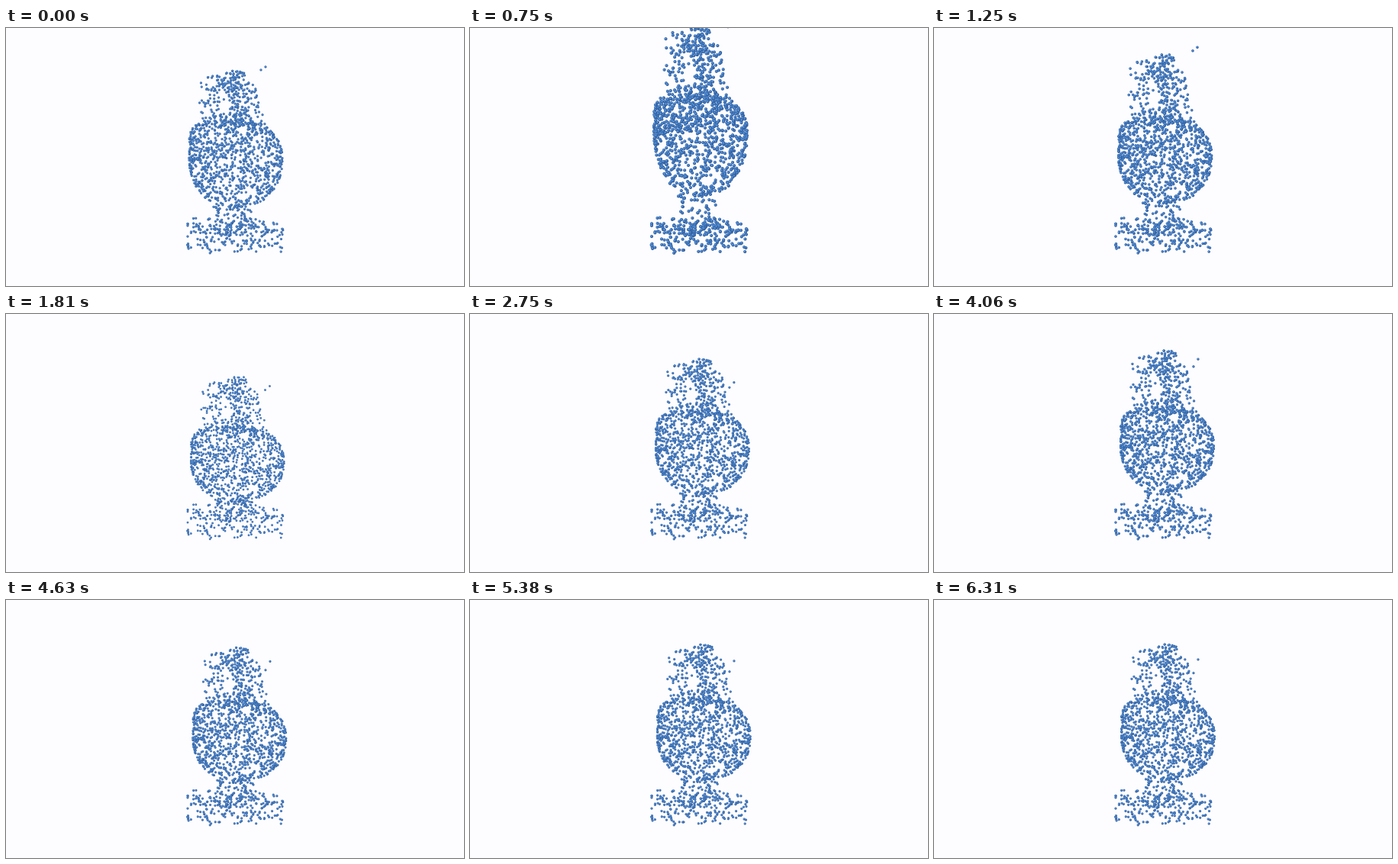
Recreate the animation shown at these times as a matplotlib script. Size 600 by 338 pixels, loop 6370 ms.

```python
import numpy as np
import matplotlib.pyplot as plt
from matplotlib.animation import FuncAnimation

W, H, DPI = 600, 338, 100
LOOP, FRAMES = 6370, 102
PX = 72 / DPI
rng = np.random.default_rng(11)

# Turning points of the vertical bounce: time in ms, offset in px
BEATS = np.array([-650, 700, 1950, 3440, 4750, 5500, 6400])
PEAKS = np.array([50, -60, 31, -23, 5, 0, 0])

# How strongly each rest height follows the bounce, going up and down
HEIGHTS = [57, 133, 180, 235, 250]
STRETCH = np.array([1, 0.7, 0.75, 0.27, 0])
SQUASH = np.array([1, 0.66, 0.5, 0.38, 0])
LEAD = np.array([0, 70, 70, 0, 0])


def swing(t):
    """Bounce offset at time t, eased between turning points."""
    t = np.asarray(t, float)
    i = np.clip(np.searchsorted(BEATS, t, side="right") - 1, 0, len(BEATS) - 2)
    s = (t - BEATS[i]) / (BEATS[i + 1] - BEATS[i])
    return PEAKS[i] + (PEAKS[i + 1] - PEAKS[i]) * (1 - np.cos(np.pi * s)) / 2


def body_half(y, right):
    """Half width of the body: square left shoulder, sloping right one."""
    d = y - 180
    power = np.where(right, 2.3, 7)
    top = 1 - np.clip(-d / 54, 0, 1) ** power
    low = 1 - np.clip(d / 57, 0, 1) ** 2.2
    return 61 * np.sqrt(np.where(d < 0, top, low))


def make_body(n):
    y = rng.uniform(126, 237, n * 3)
    u = rng.uniform(-1, 1, n * 3)
    half = body_half(y, u > 0)
    keep = np.flatnonzero(rng.uniform(0, 61, n * 3) < half)[:n]
    y, u, half = y[keep], u[keep], half[keep]
    rim = rng.random(len(keep)) < 0.45
    return 306.5 + half * np.where(rim, np.sin(np.pi / 2 * u), u), y


def make_head(n):
    y = 58 + 78 * rng.random(n) ** 0.85
    left = np.interp(y, [57, 67, 85, 136], [303, 264, 257, 262])
    right = np.interp(y, [57, 67, 85, 136], [315, 323, 334, 345])
    soft = np.clip(rng.normal(0.62, 0.18, n), 0, 1)
    u = np.where(rng.random(n) < 0.5, rng.random(n), soft)
    return left + (right - left) * u, y


def make_base(n):
    y = 249 + 49 * rng.beta(1.3, 1.8, n)
    soft = np.clip(rng.normal(300, 30, n), 238, 362)
    x = np.where((rng.random(n) < 0.4) & (y < 280), soft, rng.uniform(236.5, 363, n))
    return x, y + np.clip((x - 325) / 5, 0, 7) * (y < 262)


def make_waist(n):
    return rng.uniform(276, 325, n), rng.uniform(234, 250, n)


parts = [make_base(270), make_waist(45), make_body(950), make_head(330)]
x0, y0 = np.hstack(parts)
gain = rng.normal(1, 0.04, x0.size)
follow = np.clip((250 - y0) / 15, 0, 1)


def strays(t):
    """Two loose balls thrown off beside the head."""
    x = 346 - 6 * np.exp(-t / 700)
    y = 78 + 1.25 * swing(t - 150) - 48 * np.exp(-t / 500)
    return [x, x - 6], [y, y + 4 + 14 * (t / LOOP) ** 2]


def pose(t):
    s = swing(t + LEAD)
    lift = s * np.where(s < 0, STRETCH, SQUASH)
    y = y0 + gain * np.interp(y0, HEIGHTS, lift)
    x = x0 - 5.5 * (1 - t / LOOP) ** 1.7 * follow
    sx, sy = strays(t)
    return np.c_[np.r_[x, sx], np.r_[y, sy]]


fig = plt.figure(figsize=(W / DPI, H / DPI), dpi=DPI, facecolor="#fdfcff")
ax = fig.add_axes([0, 0, 1, 1])
ax.set(xlim=(0, W), ylim=(H, 0))
ax.axis("off")

# Each ball is a dark rim, a blue face and a small highlight
COLORS = ["#35609d", "#4484d0", "#6ca3e0"]
LAYERS = np.array([1, 0.68, 0.3])
SHADE = np.array([[0, 0], [-0.09, -0.09], [-0.16, -0.16]])
count = x0.size + 2
balls = ax.scatter(np.zeros(count * 3), np.zeros(count * 3),
                   c=COLORS * count, linewidths=0)


def draw(i):
    t = i * LOOP / FRAMES
    size = 3.1 - 0.016 * swing(t)
    balls.set_offsets((pose(t)[:, None] + SHADE * size).reshape(-1, 2))
    balls.set_sizes(np.tile((size * LAYERS * PX) ** 2, count))
    return (balls,)


anim = FuncAnimation(fig, draw, frames=FRAMES, interval=LOOP / FRAMES,
                     repeat=True, repeat_delay=0, blit=False)
plt.show()
```
